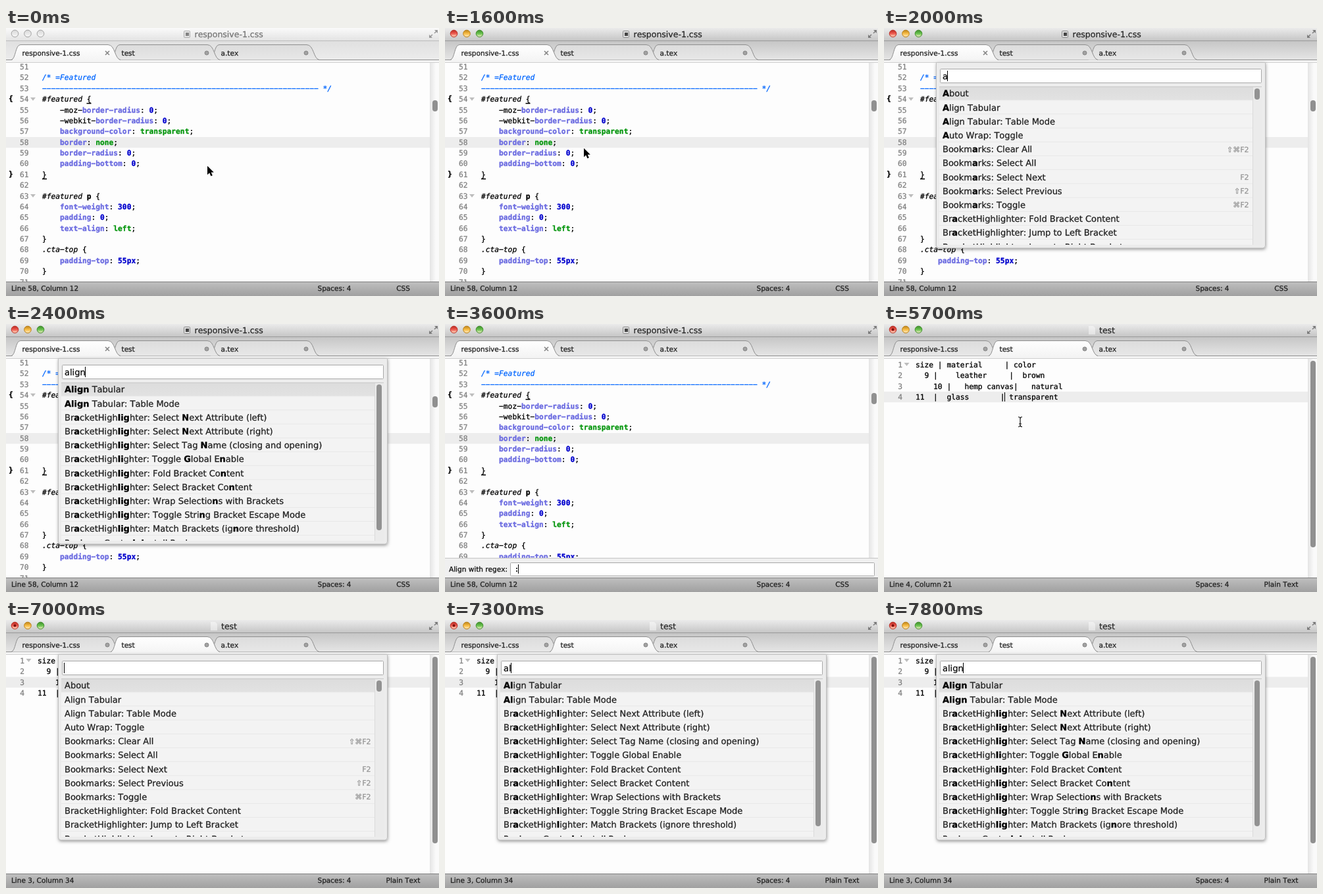
An HTML page with a canvas for the animation above (8 s loop, 658x408 px).

```html
<!DOCTYPE html>
<html>
<head>
<meta charset="utf-8">
<style>
  html, body { margin: 0; width: 100%; height: 100%; overflow: hidden; background: #fff; }
  canvas { display: block; width: 658px; height: 408px; }
</style>
</head>
<body>
<canvas></canvas>
<script>
const W = 658, H = 408, LOOP = 8000;
const canvas = document.querySelector('canvas'), g = canvas.getContext('2d');
const ratio = window.devicePixelRatio || 1;
canvas.width = W * ratio;
canvas.height = H * ratio;

const CHAR = 6.77, ROW = 16.37;
const UI = '"DejaVu Sans", sans-serif';
const MONO = '11.24px "DejaVu Sans Mono", monospace';

// Event times in ms
const ACTIVATE = 1200, ASK = 2600, COLON = 3600, ALIGN = 3900, SHOW_TEST = 5000, CLICK = 6100;
const PALETTES = [
  { open: 1900, type: 2000, close: ASK },
  { open: 6700, type: 7200, close: LOOP }
];

const CSS_LINES = [
  '', '/* =Featured', '-'.repeat(62) + ' */', '#featured {',
  '    -moz-border-radius: 0;', '    -webkit-border-radius: 0;',
  '    background-color: transparent;', '    border: none;',
  '    border-radius: 0;', '    padding-bottom: 0;', '}', '',
  '#featured p {', '    font-weight: 300;', '    padding: 0;', '    text-align: left;', '}',
  '.cta-top {', '    padding-top: 55px;', '}', ''
];
const TEST_LINES = [
  'size | material     | color',
  '  9 |    leather     |  brown',
  '    10 |   hemp canvas|   natural',
  '11  |  glass       | transparent'
];

// Asterisks enclose the letters that match the query
const BH = 'Br*a*cketHigh*lig*hter: ';
const COMMANDS = [
  '*A*bout', '*A*lign Tabular', '*A*lign Tabular: Table Mode', '*A*uto Wrap: Toggle',
  'Bookm*a*rks: Clear All|⇧⌘F2', 'Bookm*a*rks: Select All', 'Bookm*a*rks: Select Next|F2',
  'Bookm*a*rks: Select Previous|⇧F2', 'Bookm*a*rks: Toggle|⌘F2',
  'Br*a*cketHighlighter: Fold Bracket Content',
  'Br*a*cketHighlighter: Jump to Left Bracket',
  'Br*a*cketHighlighter: Jump to Right Bracket'
];
const MATCHES = [
  '*Align* Tabular', '*Align* Tabular: Table Mode',
  BH + 'Select *N*ext Attribute (left)', BH + 'Select *N*ext Attribute (right)',
  BH + 'Select Tag *N*ame (closing and opening)',
  'Br*a*cketHigh*li*ghter: Toggle *G*lobal E*n*able',
  BH + 'Fold Bracket Co*n*tent', BH + 'Select Bracket Co*n*tent',
  BH + 'Wrap Selectio*n*s with Brackets', BH + 'Toggle Stri*n*g Bracket Escape Mode',
  BH + 'Match Brackets (ig*n*ore threshold)', 'P*a*ckage Contro*l*: *I*nstall Packa*g*e'
];

const MOUSE = [
  [0, 306, 210], [1250, 305, 211], [1600, 211, 183], [4500, 211, 183],
  [4900, 190, 37], [5050, 190, 37], [5600, 207, 149], [5750, 207, 149],
  [6050, 287, 94], [LOOP, 287, 94]
];

const clamp = v => Math.max(0, Math.min(1, v));
const ease = v => v * v * (3 - 2 * v);

function rect(x, y, w, h, fill) {
  g.fillStyle = fill;
  g.fillRect(x, y, w, h);
}

function gradient(y0, y1, ...colors) {
  const fill = g.createLinearGradient(0, y0, 0, y1);
  colors.forEach((c, i) => fill.addColorStop(i / (colors.length - 1), c));
  return fill;
}

function rounded(x, y, w, h, r, fill, stroke) {
  g.beginPath();
  g.roundRect(x, y, w, h, r);
  g.fillStyle = fill;
  g.fill();
  if (stroke) { g.strokeStyle = stroke; g.lineWidth = 1; g.stroke(); }
}

function circle(x, y, r, fill, stroke) {
  rounded(x - r, y - r, 2 * r, 2 * r, r, fill, stroke);
}

function polygon(points, fill) {
  g.beginPath();
  points.forEach(([x, y]) => g.lineTo(x, y));
  g.closePath();
  g.fillStyle = fill;
  g.fill();
}

// A hairline outline gives the heavier strokes of smoothed screen text
function ink(str, x, y, color) {
  g.fillStyle = g.strokeStyle = color;
  g.lineWidth = 0.3;
  g.fillText(str, x, y);
  g.strokeText(str, x, y);
}

function label(str, x, y, size, color, align = 'left', weight = '') {
  g.font = `${weight} ${size}px ${UI}`;
  g.textAlign = align;
  ink(str, x, y, color);
  return g.measureText(str).width;
}

// Draws on the fixed character grid, with wide hyphens; returns the x after the last character
function code(str, x, y, color = '#000', style = '') {
  g.font = `${style} ${MONO}`;
  g.textAlign = 'left';
  for (const ch of str.replaceAll('-', '\u2212')) {
    if (ch !== ' ') ink(ch, x, y, color);
    x += CHAR;
  }
  return x;
}

function clipped(x, y, w, h, paint) {
  g.save();
  g.beginPath();
  g.rect(x, y, w, h);
  g.clip();
  paint();
  g.restore();
}

function caret(x, y, h, idle) {
  const phase = idle % 1000;
  g.globalAlpha = phase < 800 ? clamp(1 - (phase - 350) / 250) : clamp((phase - 800) / 200);
  rect(x, y, 1, h, '#000');
  g.globalAlpha = 1;
}

function titleBar(active, test, dirty) {
  rect(0, 0, W, 20, active ? gradient(0, 20, '#ebebeb', '#c4c4c4') : gradient(0, 20, '#fafafa', '#e2e2e2'));
  const lights = [['#ee5a50', '#b8281f'], ['#f8bd45', '#b98018'], ['#69c34e', '#3d8a2a']];
  lights.forEach(([fill, edge], i) => {
    const x = 13.5 + 19.5 * i;
    if (active) circle(x, 8.5, 5.3, gradient(3, 14, edge, fill, '#fff0d0'), edge);
    else circle(x, 8.5, 5.3, gradient(3, 14, '#d8d8d8', '#f8f8f8'), '#a0a0a0');
  });
  if (dirty) circle(13.5, 8.5, 2, '#7c120e');

  const name = test ? 'test' : 'responsive-1.css';
  const iconX = test ? 311 : 270;
  g.globalAlpha = dirty ? 0.45 : active ? 1 : 0.6;
  if (test) {
    polygon([[iconX, 3], [iconX + 7, 3], [iconX + 10, 6], [iconX + 10, 16], [iconX, 16]], '#fff');
  } else {
    rounded(iconX + 0.5, 4.5, 9, 10, 1, '#ddd', '#888');
    rect(iconX + 3, 7, 5, 5, '#444');
  }
  g.globalAlpha = 1;
  label(name, test ? 327 : 286.5, 13.7, 12.5, active ? '#2a2a2a' : '#777');

  // Full screen arrows
  const gray = active ? '#7c7c7c' : '#999';
  polygon([[651, 3], [656, 3], [656, 8]], gray);
  polygon([[643, 10], [643, 15], [648, 15]], gray);
  g.strokeStyle = gray;
  g.lineWidth = 1.5;
  g.beginPath();
  g.moveTo(655, 4); g.lineTo(651, 8);
  g.moveTo(644, 14); g.lineTo(648, 10);
  g.stroke();
}

function tabShape(x) {
  g.beginPath();
  g.moveTo(x, 48.5);
  g.bezierCurveTo(x + 7, 47, x + 6, 25.5, x + 14, 25.5);
  g.lineTo(x + 147, 25.5);
  g.bezierCurveTo(x + 158, 25.5, x + 157, 47, x + 166, 48.5);
}

function tabs(active, test, cssDirty) {
  rect(0, 20, W, 29, active ? gradient(20, 49, '#c6c6c6', '#e6e6e6') : gradient(20, 49, '#e0e0e0', '#ececec'));
  rect(0, 19, W, 1, active ? '#9a9a9a' : '#bcbcbc');
  rect(0, 48, W, 1, '#8e8e8e');
  rect(0, 49, W, 4, '#f4f4f4');
  const current = test ? 1 : 0;
  for (const i of [2, 1 - current, current]) {
    const x = 8 + 151 * i, on = i === current;
    tabShape(x);
    g.fillStyle = on ? gradient(26, 49, '#ffffff', '#f4f4f4') : gradient(26, 49, '#dcdcdc', '#e8e8e8');
    g.fill();
    g.strokeStyle = '#8e8e8e';
    g.lineWidth = 1;
    g.stroke();
    if (on) rect(x + 2, 48, 162, 2, '#f4f4f4');
    label(['responsive-1.css', 'test', 'a.tex'][i], x + 16.5, 41.5, 10.55, '#222');
    if (i || cssDirty) {
      circle(x + 146, 38, 3, '#a2a2a2', '#858585');
    } else {
      g.strokeStyle = '#858585';
      g.lineWidth = 1.6;
      g.beginPath();
      g.moveTo(151, 35); g.lineTo(157, 41);
      g.moveTo(157, 35); g.lineTo(151, 41);
      g.stroke();
    }
  }
  rect(0, 52, W, 1, '#cfcfcf');
}

function foldArrow(x, y) {
  polygon([[x - 4, y - 2.5], [x + 4, y - 2.5], [x, y + 2.5]], '#bdbdbd');
}

function lineNumber(n, right, y) {
  code(String(n), right - CHAR * String(n).length, y, '#808080');
}

function cssLine(str, x, y, aligned) {
  const rule = str.match(/^( +)(-\w+-)?([\w-]+): (.*);$/);
  const selector = str.match(/^([#.][\w-]+)( p)?( \{)$/);
  if (rule) {
    const [, indent, vendor = '', name, value] = rule;
    x = code(indent + vendor, x, y);
    x = code(name, x, y, '#6a6ae0', 'bold');
    if (aligned) x += CHAR * (22 - vendor.length - name.length);
    x = code(': ', x, y);
    x = code(value, x, y, /^\d/.test(value) ? '#0000cd' : '#06960e', 'bold');
    code(';', x, y);
  } else if (selector) {
    x = code(selector[1], x, y, '#000', 'italic');
    x = code(selector[2] || '', x, y, '#000', 'bold');
    code(selector[3], x, y);
  } else if (str === '}') {
    code(str, x, y);
  } else {
    code(str, x, y, '#0066ff', 'italic');
  }
}

function cssView(t) {
  rect(0, 166, 644, 16.4, '#ededed');
  CSS_LINES.forEach((str, i) => {
    const n = 51 + i, y = 177.7 + (n - 58) * ROW;
    lineNumber(n, 34.5, y);
    cssLine(str, 55, y, t >= ALIGN && n >= 55 && n <= 60);
    if (n === 54 || n === 63) foldArrow(41, y - 4);
  });
  code('{', 4, 111, '#000', 'bold');
  code('}', 4, 226, '#000', 'bold');
  rect(122.5, 114, 7, 1.5, '#000');
  rect(55, 229, 7, 1.5, '#000');
}

function testView(t) {
  const row = t < CLICK ? 3 : 2;
  rect(0, 53.8 + row * ROW, 644, 16.4, '#ededed');
  TEST_LINES.forEach((str, i) => {
    const y = 65.8 + i * ROW;
    lineNumber(i + 1, 28, y);
    code(str, 48, y);
  });
  foldArrow(34.5, 61.5);
  if (row === 3) caret(183, 104, 14, Math.max(0, t - 5500));
  else caret(271, 88, 14, t - CLICK);
}

function scrollBar(test, asking) {
  const track = g.createLinearGradient(644, 0, 653, 0);
  track.addColorStop(0, '#e4e4e4');
  track.addColorStop(1, '#fafafa');
  rect(644, 53, 14, 333, track);
  rounded(648, test ? 56 : asking ? 105 : 110, 8, test ? 284 : 17, 4, '#909090');
}

function regexPanel(t) {
  rect(0, 356, W, 30, '#f0f0f0');
  rect(0, 356, W, 1, '#c4c4c4');
  label('Align with regex:', 6, 377, 10.5, '#111');
  rounded(99.5, 363.5, 553, 20, 1, '#fff', '#a8a8a8');
  const typed = t >= COLON;
  if (typed) code(':', 105.5, 377);
  caret(typed ? 111 : 105, 366, 14, t - (typed ? COLON : ASK));
}

function statusBar(t, test) {
  rect(0, 386, W, 22, gradient(386, 408, '#c0c0c0', '#a0a0a0'));
  rect(0, 386, W, 1, '#7e7e7e');
  const place = !test ? (t < ALIGN ? [58, 12] : [58, 28]) : t < CLICK ? [4, 21] : [3, 34];
  label(`Line ${place[0]}, Column ${place[1]}`, 8, 400, 10.5, '#222');
  label('Spaces: 4', 499, 400, 10.5, '#222', 'center');
  label(test ? 'Plain Text' : 'CSS', 603.5, 400, 10.5, '#222', 'center');
}

function paletteRow(entry, y, typed) {
  const [name, keys] = entry.split('|');
  let x = 89, left = typed;
  name.split('*').forEach((part, i) => {
    const bold = i % 2 ? part.slice(0, left) : '';
    if (bold) x += label(bold, x, y, 13, '#000', 'left', 'bold');
    const rest = part.slice(bold.length);
    if (rest) x += label(rest, x, y, 13, '#222');
    left -= bold.length;
  });
  if (keys) label(keys, 554.5, y - 0.5, 11, '#969696', 'right');
}

function palette(t, { open, type }) {
  const typed = t < type ? 0 : Math.min(5, 1 + Math.floor((t - type) / 100));
  const rows = typed < 2 ? COMMANDS : MATCHES;

  g.save();
  g.shadowColor = 'rgba(0,0,0,.42)';
  g.shadowBlur = 5 * ratio;
  g.shadowOffsetY = 2 * ratio;
  rounded(80, 52, 500, 283, [0, 0, 4, 4], '#ececec');
  g.restore();
  rounded(79.5, 52.5, 500, 282.5, [0, 0, 4, 4], '#ececec', '#c0c0c0');

  rounded(85.5, 62.5, 488, 21, 1, '#fff', '#a8a8a8');
  const query = 'align'.slice(0, typed);
  const width = label(query, 89, 78, 13, '#111');
  caret(Math.round(88.3 + width), 65, 16, t - (typed ? type + (typed - 1) * 100 : open));

  clipped(84, 89, 490, 241, () => {
    rect(84, 89, 490, 241, '#f3f3f3');
    rows.forEach((entry, i) => {
      const top = 89 + 21.2 * i;
      if (!i) rect(84, top, 476, 21.2, gradient(89, 110, '#dcdcdc', '#e2e2e2'));
      rect(84, top + 20.2, 476, 1, '#e8e8e8');
      paletteRow(entry, top + 15.3, typed);
    });
    rect(560, 89, 14, 241, '#ebebeb');
    rect(560, 89, 1, 241, '#dadada');
    rounded(563, 92, 8, typed < 2 ? 17 : 222, 4, '#929292');
  });
  rect(84, 89, 490, 1, '#c8c8c8');
}

function mouse(t, test) {
  const i = MOUSE.findIndex(([time]) => time > t);
  const [t0, x0, y0] = MOUSE[i - 1], [t1, x1, y1] = MOUSE[i];
  const k = ease((t - t0) / (t1 - t0));
  const x = x0 + (x1 - x0) * k, y = y0 + (y1 - y0) * k;
  g.save();
  g.translate(x, y);
  g.lineJoin = 'round';
  if (test && y > 53) {
    g.beginPath();
    for (const s of [-1, 1]) {
      g.moveTo(-3, 7.5 * s);
      g.quadraticCurveTo(0, 7.5 * s, 0, 5 * s);
      g.quadraticCurveTo(0, 7.5 * s, 3, 7.5 * s);
    }
    g.moveTo(0, -6); g.lineTo(0, 6);
    g.moveTo(-2, 3); g.lineTo(2, 3);
    for (const [color, width] of [['#fff', 3], ['#111', 1.2]]) {
      g.strokeStyle = color;
      g.lineWidth = width;
      g.stroke();
    }
  } else {
    polygon([[0, 0], [0, 13.5], [3.2, 10.6], [5.4, 15.6], [7.8, 14.6], [5.7, 9.7], [9.8, 9.7]], '#000');
    g.strokeStyle = '#fff';
    g.lineWidth = 2;
    g.stroke();
    g.fill();
  }
  g.restore();
}

function draw(t) {
  const active = t >= ACTIVATE, test = t >= SHOW_TEST, changed = t >= ALIGN;
  const asking = t >= ASK && t < ALIGN;
  const openPalette = PALETTES.find(p => t >= p.open && t < p.close);

  g.setTransform(ratio, 0, 0, ratio, 0, 0);
  g.textRendering = 'geometricPrecision';
  g.fontKerning = 'none';
  g.lineJoin = 'round';
  rect(0, 0, W, H, '#fdfdfd');
  clipped(0, 53, W, 333, () => (test ? testView : cssView)(t));
  scrollBar(test, asking);
  titleBar(active, test, changed);
  tabs(active, test, changed);
  if (asking) regexPanel(t);
  statusBar(t, test);
  if (openPalette) palette(t, openPalette);
  const hidden = openPalette || (t >= ASK && t < 4500);
  if (!hidden) mouse(t, test);
}

const start = performance.now();
function tick() {
  draw((performance.now() - start) % LOOP);
  requestAnimationFrame(tick);
}
tick();
</script>
</body>
</html>
```
